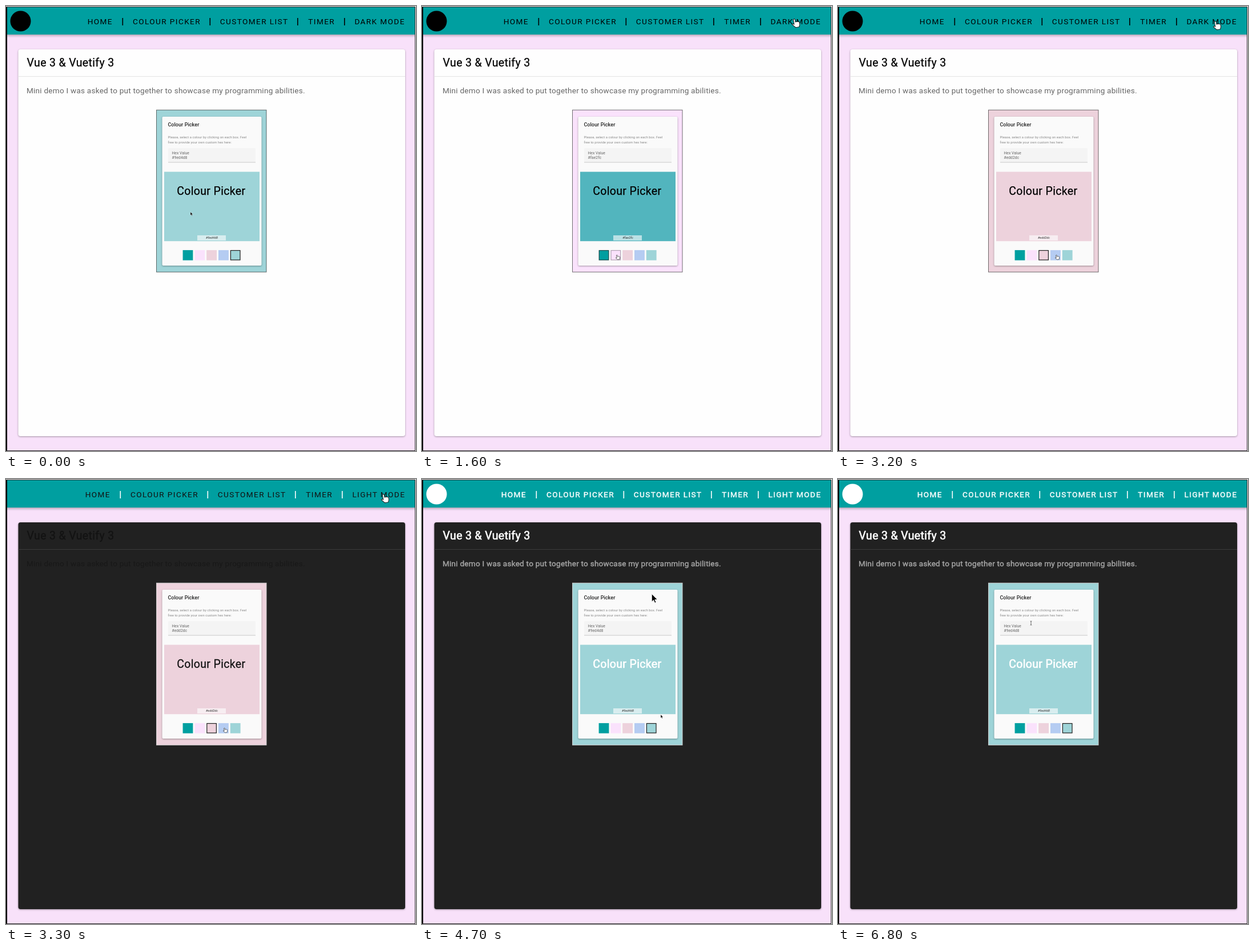
An HTML page for the animation above (6900 ms loop, 718 by 780 pixels).

```html
<!DOCTYPE html>
<html lang="en">
<head>
<meta charset="utf-8">
<title>Vue 3 & Vuetify 3</title>
<style>
  html, body { margin: 0; width: 100%; height: 100%; overflow: hidden; background: #f8e1fa; }
  svg { display: block; width: 718px; height: 780px; font-family: Roboto, Arial, sans-serif; --ink: #000; --bold: 0px; }
  .bar { filter: drop-shadow(0 2px 2px rgba(0,0,0,.3)); }
  .card { filter: drop-shadow(0 1px 1.5px rgba(0,0,0,.35)); }
  .ink { fill: var(--ink); stroke: var(--ink); stroke-width: var(--bold); }
  .nav { font-size: 13.6px; letter-spacing: 1.4px; }
  .title { font-size: 19.5px; letter-spacing: .35px; stroke-width: calc(var(--bold) + .25px); }
  .body { font-size: 13.55px; letter-spacing: .242px; opacity: .6; }
  .name { font-size: 9px; font-weight: 500; letter-spacing: .06px; fill: #222; }
  .hint { font-size: 5.8px; letter-spacing: .1px; fill: #858585; }
  .field { font-size: 6.7px; letter-spacing: .06px; fill: #666; }
  .chip { font-size: 5.5px; font-style: italic; text-anchor: middle; fill: #333; }
</style>
</head>
<body>
<svg viewBox="0 0 718 780" id="stage">
  <defs>
    <path id="arrow" d="M0 0V14L3.3 11 5.5 16 7.8 15 5.6 10.2H10Z" fill="#000" stroke="#fff" stroke-width=".9"/>
    <path id="hand" transform="translate(-1.5 -.5) rotate(-10)" d="M-1.5 1.2Q0 -.8 1.5 1.2V6Q2.6 4.8 3.9 6 5.1 5.2 6.2 6.4 7.8 5.9 8.2 7.4V11L6.6 15.5H.2L-4.6 9.8Q-5 7.8 -3.2 8.2L-1.5 9.6Z" fill="#fff" stroke="#111" stroke-linejoin="round"/>
    <path id="beam" d="M-2.5 0Q0 0 0 2V11Q0 13 -2.5 13M2.5 0Q0 0 0 2M0 11Q0 13 2.5 13" fill="none" stroke="#222" stroke-width="1.2"/>
  </defs>
  <rect width="718" height="780" fill="#f8e1fa"/>
  <rect class="bar" y="2" width="718" height="48" fill="#009fa0"/>
  <circle id="logo" cx="25.5" cy="26.5" r="18"/>
  <g id="menu">
    <g class="ink nav">
      <text x="142.7" y="32">HOME</text>
      <text x="222" y="32">COLOUR PICKER</text>
      <text x="374.8" y="32">CUSTOMER LIST</text>
      <text x="529.3" y="32">TIMER</text>
      <text x="610.4" y="32" id="mode">DARK MODE</text>
    </g>
    <path id="bars" d="M204.3 21v13M357.3 21v13M510.8 21v13M592.8 21v13" stroke-width="1.6"/>
  </g>
  <rect class="card" id="sheet" x="21.5" y="76" width="677.5" height="678" rx="4"/>
  <path id="rule" d="M21.5 123.5H699"/>
  <text class="ink title" x="36.6" y="106">Vue 3 &amp; Vuetify 3</text>
  <text class="ink body" x="36" y="153.3">Mini demo I was asked to put together to showcase my programming abilities.</text>

  <rect id="frame" x="263.5" y="182.3" width="192.5" height="284"/>
  <rect class="card" x="273.5" y="194" width="174" height="261" rx="2" fill="#fafafa"/>
  <text class="name" x="283.4" y="211">Colour Picker</text>
  <text class="hint" x="283.4" y="231.8">Please, select a colour by clicking on each box. Feel</text>
  <text class="hint" x="283.4" y="240.6">free to provide your own custom hex here:</text>
  <path d="M284 274V251q0-2 2-2H435q2 0 2 2V274Z" fill="#f4f4f4"/>
  <path d="M284 274H437" stroke="#bbb" stroke-width=".8"/>
  <text class="field" x="290.5" y="260.4">Hex Value</text>
  <text class="field hex" x="290.5" y="267.8">#9ed4d8</text>
  <rect id="panel" x="277" y="290.6" width="167" height="121.6"/>
  <rect x="335" y="402" width="50" height="9" fill="#fff" opacity=".6"/>
  <text class="chip hex" x="360.5" y="408.2">#9ed4d8</text>
  <g id="swatches"></g>
  <use id="small"/>
  <text class="ink title" x="299.2" y="330.7">Colour Picker</text>
  <path d="M0 .5H718M717.5 0V780" stroke="#fff"/>
  <path d="M1 1V780" stroke="#000" stroke-width="2"/>
  <path d="M0 1.5H717M716.5 1V780M0 779.5H717" stroke="#222"/>
  <use id="pointer"/>
</svg>
<script>
const LOOP = 6900, STEP = 100, THEME_AT = 3250, FADE = 260;
const HOP = 440, PITCH = 22;
const $ = id => document.getElementById(id);
const hexes = ['#009fa0', '#fae2fc', '#edd2dc', '#b5ccf2', '#9ed4d8'];
const clicks = [600, 1500, 2520, 3420, 4300];
const rgbs = hexes.map(h => [1, 3, 5].map(i => parseInt(h.substr(i, 2), 16)));

const clamp = v => Math.min(1, Math.max(0, v));
const ease = v => { v = clamp(v); return v * v * (3 - 2 * v); };
const lerp = (a, b, p) => a.map((v, i) => v + (b[i] - v) * p);
const mix = (a, b, p) => `rgb(${lerp(a, b, p).map(Math.round)})`;
const set = (el, attrs) => { for (const k in attrs) el.setAttribute(k, attrs[k]); };
const clickCount = t => clicks.filter(c => c <= t).length;

// keys: [time, x, y]
function along(keys, t) {
  const i = keys.findIndex(k => k[0] > t);
  if (i <= 0) return keys.at(i).slice(1);
  const [a, b] = [keys[i - 1], keys[i]];
  return lerp(a, b, (t - a[0]) / (b[0] - a[0])).slice(1);
}

// One sweep around the picture, clockwise from its top right to its left side.
function orbit(t) {
  const a = (-65 + 230 * (t - 4700) / 700) * Math.PI / 180;
  return [360 + 100 * Math.cos(a), 330 + 142 * Math.sin(a)];
}

function pointerAt(t) {
  if (t >= 4700 && t <= 5400) return orbit(t);
  if (t > 5400) return along([[5400, ...orbit(5400)], [6100, 636, 112], [6500, 724, 38]], t);
  return along([
    [300, 724, 165], [600, 681, 107], [900, 677, 117], [1400, 655, 33], [1600, 653, 23],
    [2050, 664, 20], [2500, 644, 34], [2800, 662, 27], [4000, 662, 27], [4700, ...orbit(4700)]
  ], t);
}

// After each click the small hand hops on to the next swatch.
function smallAt(t) {
  const n = clickCount(t);
  if (!n) return along([[0, 323, 361], [500, 317, 436]], t);
  if (n < 5) return [317 + PITCH * (n - 1 + ease((t - clicks[n - 1]) / HOP)), 436.5];
  return along([[4300, 405, 437], [4700, 418, 413], [6100, 345, 249], [6800, 338, 249]], t);
}

function place(el, kind, [x, y], scale) {
  set(el, { href: '#' + kind, transform: `translate(${x} ${y}) scale(${scale})` });
}

const swatches = hexes.map((h, i) => {
  const r = document.createElementNS('http://www.w3.org/2000/svg', 'rect');
  set(r, { x: 310.2 + i * 20.8, y: 428.5, width: 16.6, height: 16.6, fill: h, 'stroke-width': 1.2 });
  return $('swatches').appendChild(r);
});

function drawPicker(t) {
  const n = clickCount(t), now = (n + 4) % 5, old = (n + 3) % 5;
  const p = n ? ease((t - clicks[n - 1]) / FADE) : 1;
  set($('frame'), { fill: hexes[now] });
  set($('panel'), { fill: mix(rgbs[old], rgbs[now], p) });
  document.querySelectorAll('.hex').forEach(e => e.textContent = hexes[now]);
  swatches.forEach((s, i) => {
    const chosen = i === now ? p : i === old ? 1 - p : 0;
    set(s, { stroke: mix(rgbs[i], [30, 30, 30], chosen) });
  });
}

function drawTheme(t) {
  const dark = t >= THEME_AT;
  const p = ease((t - THEME_AT) / 300);
  const style = $('stage').style;
  style.setProperty('--ink', mix([0, 0, 0], [255, 255, 255], p));
  style.setProperty('--bold', .4 * p + 'px');
  set($('logo'), { fill: dark ? '#fff' : '#000', opacity: dark && t < THEME_AT + 150 ? 0 : 1 });
  set($('menu'), { transform: `translate(${dark ? -4 : 0} 0)` });
  $('mode').textContent = dark ? 'LIGHT MODE' : 'DARK MODE';
  set($('bars'), { stroke: dark ? '#fff' : '#000' });
  set($('sheet'), { fill: dark ? '#212121' : '#fefefe' });
  set($('rule'), { stroke: dark ? '#3c3c3c' : '#e4e4e4' });
  set($('frame'), { stroke: dark ? '#ccc' : 'rgba(0,0,0,.55)' });
}

function drawCursors(t) {
  const big = pointerAt(t), small = smallAt(t);
  place($('pointer'), big[1] < 44 && t < 4100 ? 'hand' : 'arrow', big, 1);
  const kind = small[1] >= 427 ? 'hand' : small[1] < 275 ? 'beam' : 'arrow';
  place($('small'), kind, small, kind === 'arrow' ? .42 : .55);
}

const start = performance.now();
function tick() {
  const t = Math.floor((performance.now() - start) % LOOP / STEP) * STEP;
  drawPicker(t);
  drawTheme(t);
  drawCursors(t);
  requestAnimationFrame(tick);
}
tick();
</script>
</body>
</html>
```
